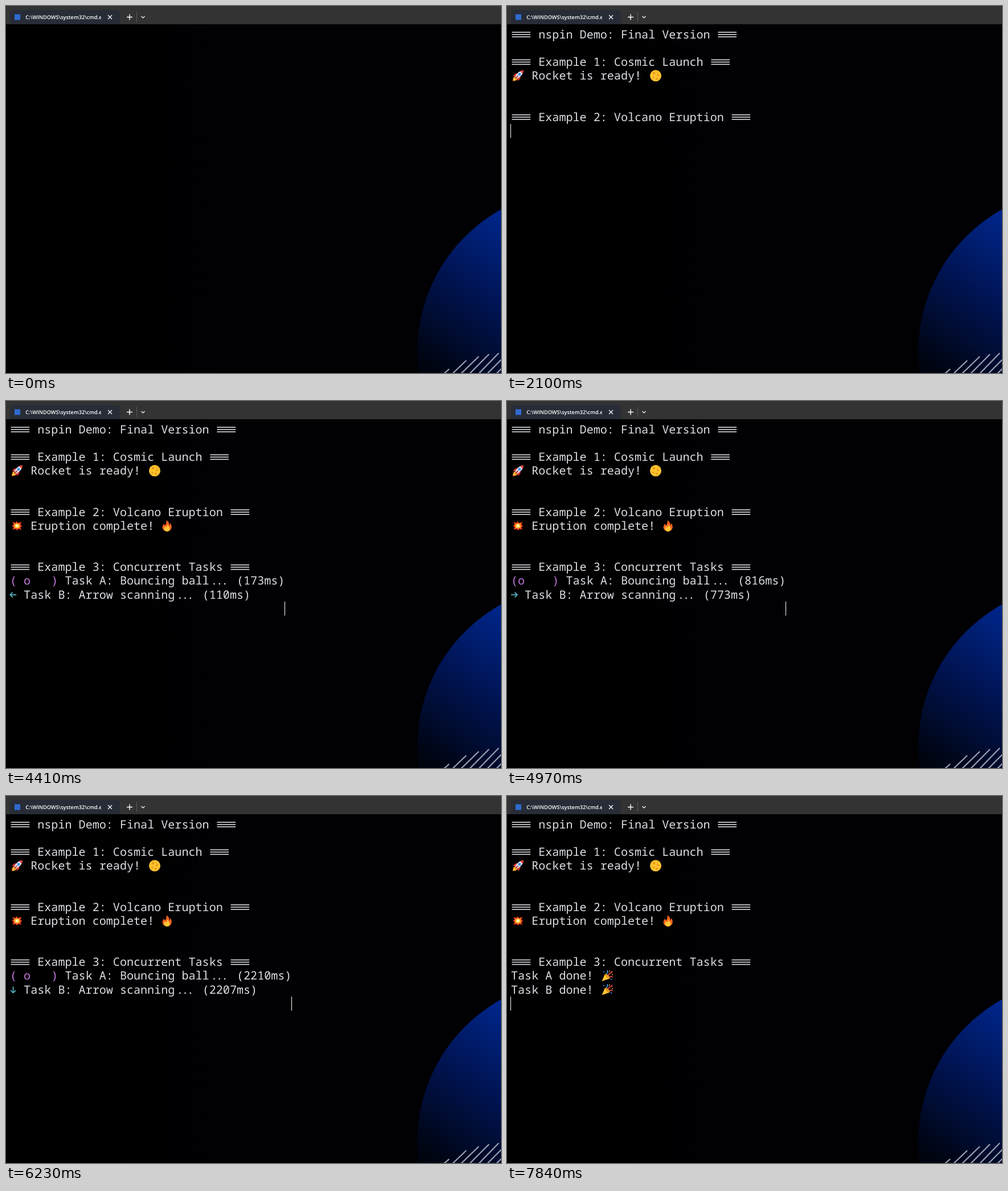
Write an HTML page that moves like this. It is 869 by 644 pixels and loops after 8 s.

```html
<!DOCTYPE html>
<html lang="en">
<head>
<meta charset="utf-8">
<title>nspin demo</title>
<style>
  html, body { margin: 0; width: 100%; height: 100%; overflow: hidden; background: #000; }
  svg { display: block; width: 869px; height: 644px; }
  text { white-space: pre; text-rendering: geometricPrecision; }
  #term text { font: 20.1px "Noto Sans Mono", "DejaVu Sans Mono", monospace; }
  #tab { font: 600 9.2px "Open Sans", "Noto Sans", sans-serif; fill: #fff; }
</style>
</head>
<body>
<svg viewBox="0 0 869 644">
  <defs>
    <linearGradient id="night"><stop offset=".1" stop-color="#000"/><stop offset=".5" stop-color="#010104"/></linearGradient>
    <linearGradient id="planet" gradientUnits="userSpaceOnUse" x1="735" y1="630" x2="905" y2="385">
      <stop offset="0" stop-color="#00040f"/><stop offset=".5" stop-color="#001350"/><stop offset="1" stop-color="#00268c"/>
    </linearGradient>
    <clipPath id="tabClip"><rect x="30" y="8" width="137" height="24"/></clipPath>

    <!-- emoji, centred on 0,0 -->
    <g id="rocket">
      <path d="M-9.500 9.500Q-9-1-3 2L-1 4Q0 9-9.500 9.500Z" fill="#ff9a1f"/>
      <path d="M-8 8Q-7 2-3.500 3.500Q-2 7-8 8Z" fill="#ffd34a"/>
      <path d="M-1-4Q-6-5-9 1L-4 1ZM4 1Q5 6-1 9L-1 4Z" fill="#e23b3b"/>
      <path d="M9.500-9.500Q1-9-5 1L-1 5Q9-1 9.500-9.500Z" fill="#dfe3ee"/>
      <path d="M9.500-9.500Q6-9.500 3.500-8L8-3.500Q9.500-6 9.500-9.500Z" fill="#e23b3b"/>
      <circle cx="2.500" cy="-2.500" r="2.400" fill="#2f8fe0"/>
      <path d="M-5 5L0 0" stroke="#b22b3a" stroke-width="1.800"/>
    </g>
    <g id="moon">
      <circle r="10" fill="#ffc32e"/>
      <g fill="#e99a1c"><circle cx="-3" cy="-4.500" r="2.300"/><circle cx="4" cy="-1" r="2"/><circle cx="-4" cy="3" r="1.700"/><circle cx="2" cy="5.500" r="2"/><circle cx="4" cy="-6" r="1.100"/></g>
    </g>
    <g id="boom">
      <path d="M-8-7L-3-5L-1-8L2-5L8-7L6-2L9 0L6 3L8 7L3 5.500L0 8L-3 5.500L-8 7L-6 2.500L-9 0L-6-2.500Z" fill="#ee3a1c"/>
      <path d="M-5-4.500L-2-3L0-5L2-3L5-4.500L4-1L6 0L4 2L5 4.500L2 3.500L0 5L-2 3.500L-5 4.500L-4 1.500L-6 0L-4-1.500Z" fill="#ffbe2c"/>
      <circle r="2.500" fill="#fff3b8"/>
    </g>
    <g id="volcano">
      <path d="M-2-3Q-7-5-3-8Q0-11 3-8Q7-6 2-3Z" fill="#8d8794"/>
      <path d="M-10 9L-3-3H3L10 9Z" fill="#79523f"/>
      <path d="M-3-3H3L5 1L3 5L1 1L-1 7L-3 2L-5 3Z" fill="#ff6a1c"/>
    </g>
    <g id="fire">
      <path d="M-1-10Q5-6 4-1Q6-2 6-5Q9 0 8 4Q6 10 0 10Q-7 9-8 3Q-8-1-5-4Q-5-1-3-1Q0-5-1-10Z" fill="#f8641f"/>
      <path d="M0-2Q5 2 5 5Q4 10 0 10Q-5 9-5 5Q-5 2-3 1Q-2 3-1 3Q1 1 0-2Z" fill="#ffc936"/>
    </g>
    <g id="party">
      <path d="M-9.500 9.500L-4-3Q2-1 4 5Z" fill="#ffc42e"/>
      <path d="M-4-3Q0-4 3 0Q6 4 4 5Q0 5-2 1Q-5-2-4-3Z" fill="#e39420"/>
      <g fill="none" stroke-width="1.700" stroke-linecap="round">
        <path d="M-1-4Q2-6 0-9" stroke="#3f9df2"/><path d="M2-1Q3-5 6-5Q9-5 8-8" stroke="#ee4b3c"/><path d="M5 2Q7 0 9 2" stroke="#ee4b3c"/>
      </g>
      <g fill="#ffb02e"><circle cx="4" cy="-8" r="1"/><circle cx="9" cy="-2" r="1"/></g>
      <g fill="#3f9df2"><circle cx="-6" cy="-7" r="1.100"/><circle cx="7" cy="6" r="1.100"/></g>
    </g>
  </defs>

  <rect width="869" height="644" fill="url(#night)"/>
  <circle cx="1008" cy="607" r="286" fill="url(#planet)"/>
  <path d="M778 637L769 645M808 622L784 645M830 615L799 645M848 611L814 645M865 609L830 645M870 620L845 645M870 636L861 645" stroke="#9aa0b5" stroke-width="2.200"/>

  <rect width="869" height="32" fill="#333"/>
  <path d="M3 32Q7 32 7 28V14Q7 7 14 7H193Q200 7 200 14V28Q200 32 204 32Z" fill="#282c36"/>
  <rect x="15" y="14.500" width="10" height="10" fill="#2f6bd0"/>
  <g clip-path="url(#tabClip)"><text id="tab" x="34.300" y="23">C:\WINDOWS\system32\cmd.exe</text></g>
  <path d="M229.500 10V28" stroke="#5a5a5a"/>
  <g fill="none" stroke="#fff" stroke-width="1.200">
    <path d="M179 16L186 23M186 16L179 23"/>
    <path d="M212 19.500H222M217 14.500V24.500" stroke-width="1.400"/>
    <path d="M237.500 18L240.500 21L243.500 18"/>
  </g>
  <g id="term"></g>
</svg>
<script>
const LOOP = 8000, STEP = 70, RATE = 1.115;   // RATE: terminal ms per shown ms
const START = [265, 2275, 4719];              // terminal time of each example
const CELL = 12.06, LINE = 24.15, LEFT = 7, TOP = 38.3;
const FG = '#dcdfe4', BLUE = '#61afef', PURPLE = '#c678dd', CYAN = '#56b6c2';
const BALL = ['(o    )', '( o   )', '(  o  )', '(   o )', '(    o)', '(   o )', '(  o  )', '( o   )'];
const term = document.getElementById('term');

const px = col => LEFT + col * CELL;
const py = row => TOP + row * LINE;

const raw = (row, x, str, fill, attr = '') =>
  `<text x="${x.toFixed(2)}" y="${(py(row) + 18.4).toFixed(2)}" fill="${fill}"${attr}>${str}</text>`;
const put = (row, col, str, fill = FG) => raw(row, px(col), str, fill);
const dots = (row, col) => raw(row, px(col) + 2.8, '...', FG, ' letter-spacing="-2.8"');
const emoji = (row, x, name) => `<use href="#${name}" x="${x}" y="${py(row) + 11.6}"/>`;

// the three stacked bars of a "===" ligature
const bars = (row, col) => [7.8, 11.8, 15.8].map(dy =>
  `<rect x="${px(col) + 1.6}" y="${py(row) + dy - 0.8}" width="32.6" height="1.6" fill="${FG}"/>`).join('');
const header = (row, str) => bars(row, 0) + put(row, 4, str) + bars(row, str.length + 5);

const cursor = (row, col) =>
  `<rect x="${Math.floor(px(col) - 0.1)}" y="${Math.round(py(row))}" width="1" height="24.5" fill="#fff"/>`;

const halfDisc = (row, n) => `<g transform="translate(12.5 ${py(row) + 12.7}) rotate(${n * 90})">
  <circle r="4.7" fill="none" stroke="${BLUE}" stroke-width="1.4"/><path d="M0-5A5 5 0 0 0 0 5Z" fill="${BLUE}"/></g>`;
const arrow = (row, n) => `<path transform="translate(12.6 ${py(row) + 12}) rotate(${n * 90})"
  d="M5.500 0H-5M-1-4.500L-5.300 0L-1 4.500" fill="none" stroke="${CYAN}" stroke-width="1.700"/>`;

// number of redraws a spinner has made; at(n) is the elapsed time of the nth
function ticks(at, elapsed) {
  let n = 0;
  while (at(n + 1) <= elapsed) n++;
  return n;
}
const ms = v => `(${Math.round(v)}ms)`;

const tickLaunch = n => 125.86 * n;
const tickMagma = n => 156.25 * n;
const tickBall = n => -9.8 + 91.3 * n + 0.05 * n * n;
const tickArrow = n => -0.52 + 110.53 * n - 0.0079 * n * n;

// a label with a trailing ellipsis and its elapsed time
function waiting(row, col, label, time) {
  const end = col + label.length;
  return { svg: put(row, col, label) + dots(row, end) + put(row, end + 4, time), end: end + 4 + time.length };
}

function launch(elapsed) {
  const n = ticks(tickLaunch, elapsed);
  if (!n) return cursor(3, 0);
  const line = waiting(3, 2, 'Preparing rocket', ms(tickLaunch(n)));
  return halfDisc(3, n - 1) + line.svg + cursor(4, line.end);
}

function eruption(elapsed) {
  const n = ticks(tickMagma, elapsed);
  if (!n) return cursor(7, 0);
  const time = ms(tickMagma(n)), icon = emoji(7, 19.3, n % 2 ? 'volcano' : 'boom');
  if (tickMagma(n) < 1200) {
    const line = waiting(7, 3, 'Magma rising', time);
    return icon + line.svg + cursor(8, line.end);
  }
  const str = 'Magma at 50% ' + time;
  return icon + put(7, 3, str) + cursor(8, 3 + str.length);
}

function tasks(elapsed) {
  const a = ticks(tickBall, elapsed), b = ticks(tickArrow, elapsed);
  const doneA = elapsed >= 3040, doneB = elapsed >= 4000;
  let out = '', row = 11, col = 0;
  if (doneA) {
    out += put(11, 0, 'Task A done!') + emoji(11, 176, 'party');
  } else if (a) {
    const line = waiting(11, 8, 'Task A: Bouncing ball', ms(tickBall(a)));
    out += put(11, 0, BALL[(a - 1) % 8], PURPLE) + line.svg;
    row = 13; col = line.end;
  }
  if (doneB) {
    out += put(12, 0, 'Task B done!') + emoji(12, 176, 'party');
    row = 13; col = 0;
  } else if (b) {
    const line = waiting(12, 2, 'Task B: Arrow scanning', ms(tickArrow(b)));
    out += arrow(12, b - 1) + line.svg;
    row = 13;
    if (doneA || tickArrow(b) > tickBall(a)) col = line.end;
  }
  // the cursor jumps up to rewrite task A as it finishes
  if (elapsed >= 3000 && !doneA) row = 11;
  return out + cursor(row, col);
}

function screen(now) {
  const [one, two, three] = START.map(s => now - s);
  if (one < 0) return '';
  let out = header(0, 'nspin Demo: Final Version') + header(2, 'Example 1: Cosmic Launch');
  if (two < 0) return out + launch(one);
  out += emoji(3, 19.5, 'rocket') + put(3, 3, 'Rocket is ready!') + emoji(3, 261, 'moon')
    + header(6, 'Example 2: Volcano Eruption');
  if (three < 0) return out + eruption(two);
  return out + emoji(7, 19.3, 'boom') + put(7, 3, 'Eruption complete!') + emoji(7, 282.5, 'fire')
    + header(10, 'Example 3: Concurrent Tasks') + tasks(three);
}

const t0 = performance.now();
let shown = -1;
function draw() {
  const step = Math.floor((performance.now() - t0) % LOOP / STEP);
  if (step !== shown) {
    shown = step;
    term.innerHTML = screen(step * STEP * RATE);
  }
  requestAnimationFrame(draw);
}
draw();
</script>
</body>
</html>
```
